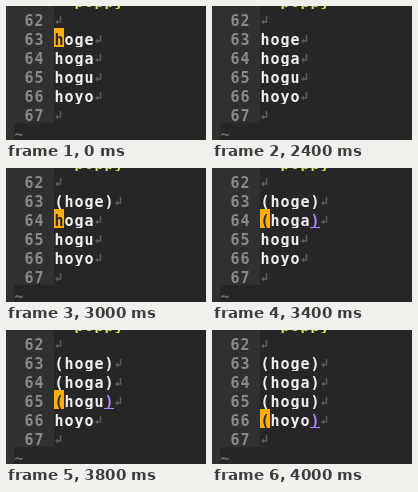
An HTML page with a canvas that plays this animation: 200x134 px, repeating every 6.6 s.

```html
<!DOCTYPE html>
<html lang="en">
<head>
<meta charset="utf-8">
<title>Adding parentheses line by line</title>
<style>
  html, body { margin: 0; width: 100%; height: 100%; overflow: hidden; background: #262626; }
  canvas { display: block; width: 200px; height: 134px; }
</style>
</head>
<body>
<canvas id="stage" width="200" height="134"></canvas>
<script>
const ctx = document.getElementById('stage').getContext('2d');
const LOOP = 6600, CELL = 10, ROW = 19, TOP = 3, TEXT_X = 48;
const WORDS = ['hoge', 'hoga', 'hogu', 'hoyo'];

// From each time on: how many words are wrapped, and the cursor's word (-1 = hidden).
const STEPS = [
  { at: 0, wrapped: 0, cursor: 0 },
  { at: 2400, wrapped: 0, cursor: -1 },
  { at: 2600, wrapped: 1, cursor: 0 },
  { at: 3000, wrapped: 1, cursor: 1 },
  { at: 3400, wrapped: 2, cursor: 1 },
  { at: 3600, wrapped: 2, cursor: 2 },
  { at: 3800, wrapped: 3, cursor: 2 },
  { at: 4000, wrapped: 4, cursor: 3 }
];

function rect(x, y, w, h, color) {
  ctx.fillStyle = color;
  ctx.fillRect(x, y, w, h);
}

// Centres one character in each cell; each row cuts off what hangs below it.
function write(text, x, row, color) {
  const y = TOP + row * ROW;
  ctx.save();
  ctx.beginPath();
  ctx.rect(0, y, 200, ROW);
  ctx.clip();
  ctx.fillStyle = color;
  [...text].forEach((char, i) => ctx.fillText(char, x + (i + 0.5) * CELL, y + 17));
  ctx.restore();
}

function lineEnd(x, row) {
  const y = TOP + row * ROW;
  ctx.strokeStyle = ctx.fillStyle = '#5c5c5c';
  ctx.lineWidth = 1.5;
  ctx.beginPath();
  ctx.moveTo(x + 6.5, y + 7);
  ctx.lineTo(x + 6.5, y + 13);
  ctx.lineTo(x + 3, y + 13);
  ctx.stroke();
  ctx.beginPath();
  ctx.moveTo(x + 1, y + 13);
  ctx.lineTo(x + 4, y + 10.5);
  ctx.lineTo(x + 4, y + 15.5);
  ctx.fill();
}

function drawWord(word, index, step) {
  const row = index + 1, y = TOP + row * ROW;
  const wrapped = index < step.wrapped;
  const text = wrapped ? `(${word})` : word;
  const end = TEXT_X + text.length * CELL;
  write(text, TEXT_X, row, '#f0f0f0');
  lineEnd(end, row);
  if (index !== step.cursor) return;

  rect(TEXT_X, y, CELL, ROW, '#ffaf00');
  write(text[0], TEXT_X, row, '#262626');
  if (wrapped) {
    rect(end - CELL, y, CELL, ROW, '#262626');
    write(')', end - CELL, row, '#af87ff');
    rect(end - CELL, y + 18, CELL, 1, '#af87ff');
  }
}

function draw(now) {
  const time = now % LOOP;
  const step = STEPS.findLast(({ at }) => at <= time);
  ctx.font = '700 15px "DejaVu Sans Mono", monospace';
  ctx.textAlign = 'center';
  rect(0, 0, 200, 134, '#262626');
  rect(0, 0, 8, 134, '#303030');
  rect(8, 0, 40, TOP + 6 * ROW, '#303030');
  write('poppy', 68, -1, '#d7e05f');
  for (let row = 0; row < 6; row++) write(String(62 + row), 18, row, '#8a8a8a');
  lineEnd(TEXT_X, 0);
  WORDS.forEach((word, i) => drawWord(word, i, step));
  lineEnd(TEXT_X, 5);
  write('~', 8, 6, '#6c6c6c');
  requestAnimationFrame(draw);
}
requestAnimationFrame(draw);
</script>
</body>
</html>
```
